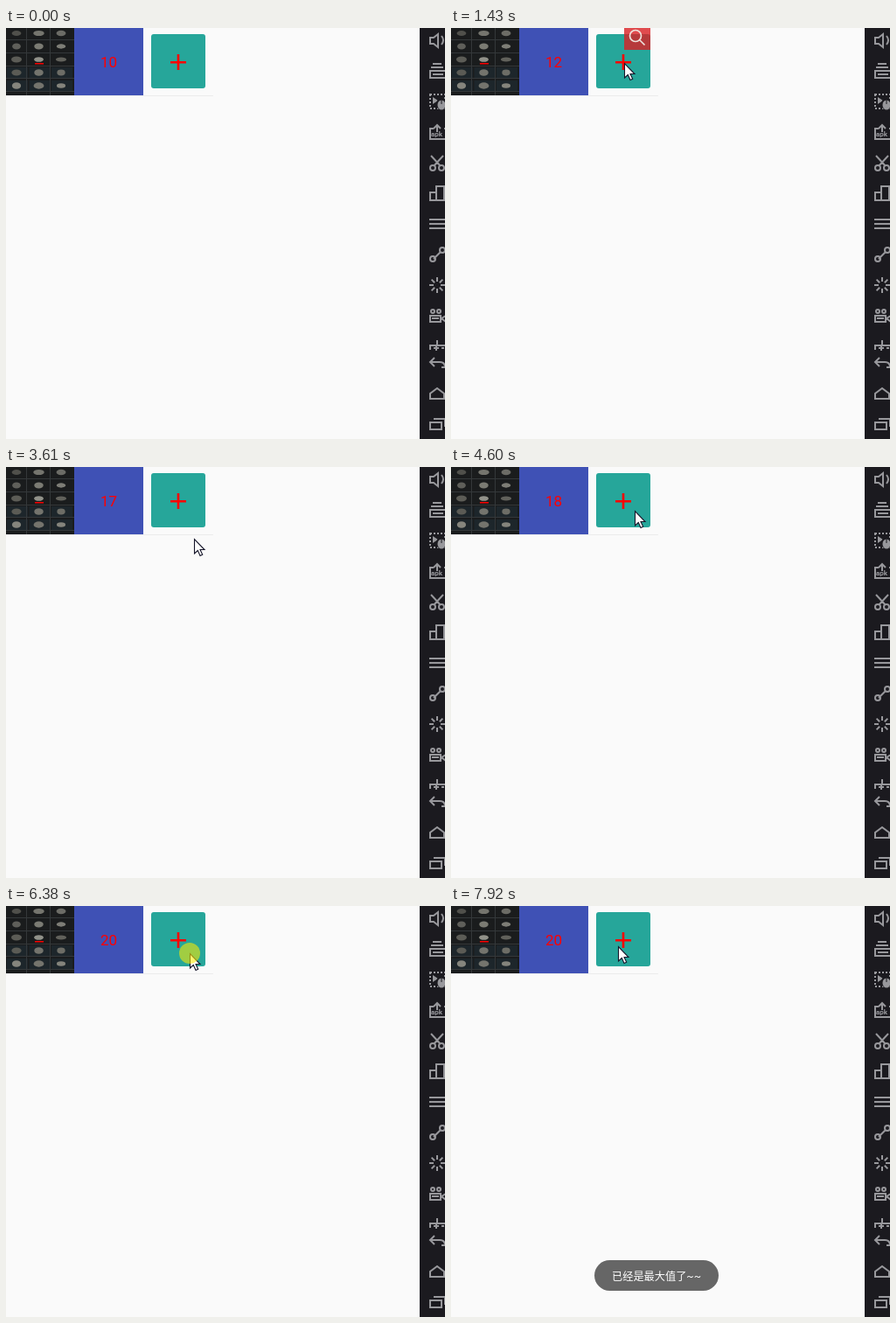
Animation of 502 by 470 pixels, one loop 8 s. Source, as an HTML page with a canvas:

```html
<!DOCTYPE html>
<html lang="zh-CN">
<head>
<meta charset="utf-8">
<style>
html, body { margin: 0; width: 100%; height: 100%; overflow: hidden; background: #fafafa; }
canvas { display: block; }
</style>
</head>
<body>
<canvas id="stage" width="502" height="470"></canvas>
<script>
const ctx = document.getElementById('stage').getContext('2d');
const LOOP = 8000;
const STEP = 76;
const MAX = 20;
const RED = '#f00';
const BAR = '#1b1a1f';
const ICON = '#98989c';

// Press and release time of each click.
const clicks = [[970, 1060], [1350, 1430], [1660, 1740], [1900, 1980], [2220, 2370], [2600, 2690],
  [3150, 3300], [4450, 4450], [5060, 5230], [5670, 5750], [6380, 6530]];

// Pointer moves: start, end, target x, target y.
const moves = [[140, 890, 198, 40], [3533, 3690, 228, 112], [3690, 3990, 163, 22],
  [3990, 4370, 198, 34], [4523, 4680, 218, 62], [4833, 4990, 210, 54], [7843, 7919, 191, 46]];

const countAt = t => Math.min(MAX, 10 + clicks.filter(c => c[1] <= t).length);
const pressedAt = t => clicks.some(([down, up]) => t >= down && t < up);

// A double click opens the lens until the next press.
function lensAt(t) {
  const n = clicks.filter(c => c[0] <= t).length;
  if (n === 0 || n % 2) return false;
  const [down, up] = clicks[n - 1];
  return t >= up && down - clicks[n - 2][0] < 400;
}

function pointerAt(t) {
  if (t < moves[0][0]) return null;
  let x = 395, y = 416;
  for (const [start, end, toX, toY] of moves) {
    if (t < start) break;
    const held = Math.floor((t - start) / STEP) * STEP;
    const k = t >= end ? 1 : held / (end - start);
    const ease = 1 - (1 - k) ** 1.3;
    x += (toX - x) * ease;
    y += (toY - y) * ease;
  }
  return [Math.round(x), Math.round(y)];
}

const toastAt = t => t < 6700 ? 0 : Math.min(1, (Math.floor((t - 6700) / STEP) + 1) / 5);

function seeded(seed) {
  return () => (seed = seed * 16807 % 2147483647) / 2147483647;
}

function box(c, color, x, y, w, h, r = 0) {
  c.fillStyle = color;
  c.beginPath();
  c.roundRect(x, y, w, h, r);
  c.fill();
}

function disc(c, color, x, y, rx, ry = rx) {
  c.fillStyle = color;
  c.beginPath();
  c.ellipse(x, y, rx, ry, 0, 0, Math.PI * 2);
  c.fill();
}

function drawPhoto(c) {
  const rand = seeded(11);
  box(c, '#1a1c1d', 0, 0, 78, 77);
  for (let row = 0; row < 5; row++) {
    for (let col = 0; col < 3; col++) {
      const x = 12 + col * 25.5, y = 6 + row * 15;
      const bright = 80 + rand() * 55 + (col === 1 ? 35 : 0);
      if (row > 2) box(c, '#1d262b', x - 11, y - 6, 24, 13);
      disc(c, `rgb(${bright},${bright},${bright * .94})`, x, y, 4.5 + rand() * 2, 2.5 + rand() * 1.5);
    }
  }
  c.fillStyle = '#34383a';
  for (let x = 23; x < 77; x += 27) c.fillRect(x, 0, 1, 77);
  for (let y = 13; y < 77; y += 14.75) c.fillRect(0, Math.round(y), 78, 1);
  box(c, RED, 33, 40, 10, 1.5);
}

const ring = (x, y, r) => `M${x + r} ${y}a${r} ${r} 0 1 1 ${-2 * r} 0a${r} ${r} 0 1 1 ${2 * r} 0`;

function drawSidebar(c) {
  box(c, BAR, 473, 0, 29, 470);
  c.strokeStyle = ICON;
  c.lineWidth = 2;
  const icons = [
    'M485 11h4l5-4v15l-5-4h-4zM498 9q4 5 0 10',
    'M488 41h10M486 45h14M485 49h18v8h-18zM488 53h12',
    'M489 115h-4v12h20v-12h-4M493 119v-8M489 115l4-4 4 4',
    'M486 146l11 12M500 146l-11 12' + ring(488, 160, 3) + ring(498, 160, 3),
    'M485 188h7v9h-7zM492 181h9v16h-9z',
    'M484 219h20M484 224h20M484 229h20',
    'M489 264l8-8' + ring(488, 264, 3) + ring(499, 254, 3),
    ring(488, 324, 2) + ring(495, 324, 2) + 'M485 329h12v7h-12zM487 332h8M498 332l5-3v7z',
    'M493 357v5M485 368v-5h20v5M492 364v5M489 366h6M498 366h3',
    'M490 377l-5 5 5 5M485 382h11q6 0 6 6h-4',
    'M485 424v-6l8-6 8 6v6z',
    'M485 451h13v8h-13zM489 447h13v9'
  ];
  icons.forEach(d => c.stroke(new Path2D(d)));
  for (let i = 0; i < 8; i++) {
    const a = i * Math.PI / 4, x = Math.cos(a), y = Math.sin(a);
    c.beginPath();
    c.moveTo(493 + x * 4, 294 + y * 4);
    c.lineTo(493 + x * 9, 294 + y * 9);
    c.stroke();
  }
  c.setLineDash([2, 2]);
  c.strokeRect(485, 76, 17, 16);
  c.setLineDash([]);
  c.fillStyle = ICON;
  c.fill(new Path2D('M488 79l6 4-6 4z'));
  disc(c, BAR, 498, 87, 6, 7);
  disc(c, ICON, 498, 88, 4.5, 5.5);
  box(c, BAR, 497.5, 82, 1, 5);
  c.fillStyle = ICON;
  c.font = 'bold 8px Roboto, sans-serif';
  c.fillText('apk', 486, 124);
}

function makeBackdrop() {
  const layer = document.createElement('canvas');
  layer.width = 502;
  layer.height = 470;
  const c = layer.getContext('2d');
  box(c, '#fafafa', 0, 0, 502, 470);
  drawPhoto(c);
  box(c, '#3f51b5', 78, 0, 79, 77);
  box(c, '#ececec', 0, 77, 237, 1);
  box(c, '#26a69a', 166, 7, 62, 62, 3);
  box(c, RED, 188, 38, 18, 2.5);
  box(c, RED, 195.7, 30, 2.6, 18);
  drawSidebar(c);
  return layer;
}

const backdrop = makeBackdrop();
const arrow = new Path2D('M.5 .5v16.5l3.8-3.5 2.7 6 2.7-1.2-2.7-5.8h5z');
const glass = new Path2D(ring(211, 9, 6.5) + 'M216 14l5.5 5.5');

function drawLens() {
  box(ctx, 'rgba(218,32,36,.8)', 198, 0, 30, 25);
  ctx.strokeStyle = '#eee2dc';
  ctx.lineWidth = 1.7;
  ctx.stroke(glass);
}

function drawPointer(x, y) {
  ctx.save();
  ctx.translate(x, y);
  ctx.fillStyle = '#fff';
  ctx.fill(arrow);
  ctx.strokeStyle = '#16162a';
  ctx.lineWidth = 1.1;
  ctx.stroke(arrow);
  ctx.restore();
}

function drawToast(alpha) {
  ctx.globalAlpha = alpha;
  box(ctx, '#666', 164, 405, 142, 35, 17.5);
  ctx.fillStyle = '#fff';
  ctx.font = '12.2px Roboto, "Noto Sans CJK SC", "Noto Sans CJK", sans-serif';
  ctx.fillText('已经是最大值了~~', 235, 427.5);
  ctx.globalAlpha = 1;
}

function draw(t) {
  ctx.drawImage(backdrop, 0, 0);
  ctx.textAlign = 'center';
  ctx.fillStyle = RED;
  ctx.font = '17px Roboto, sans-serif';
  ctx.fillText(countAt(t), 117.5, 45);
  if (lensAt(t)) drawLens();
  const tip = pointerAt(t);
  if (tip) drawPointer(...tip);
  if (pressedAt(t)) disc(ctx, 'rgba(255,235,0,.57)', ...tip, 12);
  const alpha = toastAt(t);
  if (alpha) drawToast(alpha);
}

const start = performance.now();
function tick() {
  draw((performance.now() - start) % LOOP);
  requestAnimationFrame(tick);
}
tick();
</script>
</body>
</html>
```
